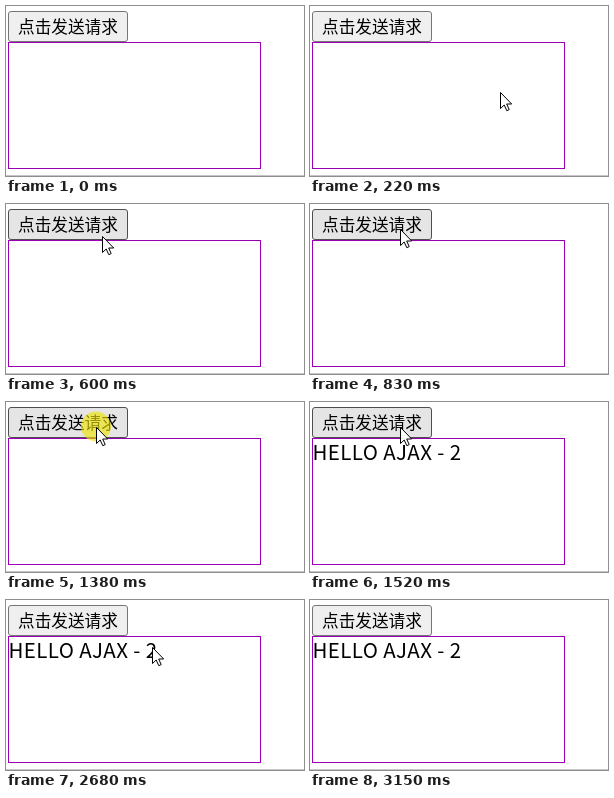
An HTML page that plays this animation: 298x170 px, repeating every 3850 ms.

```html
<!DOCTYPE html>
<html lang="zh-CN">
<head>
<meta charset="utf-8">
<title>AJAX</title>
<style>
  html, body { margin: 0; width: 100%; height: 100%; overflow: hidden; background: #fff; }
  svg { display: block; width: 100%; height: 100%; }
  text { font-family: "Noto Sans CJK SC", "Noto Sans CJK", "Noto Sans CJK JP", sans-serif; fill: #000; }
</style>
</head>
<body>
<svg viewBox="0 0 298 170" xmlns="http://www.w3.org/2000/svg">
  <rect width="298" height="170" fill="#fff"/>
  <rect y="169" width="298" height="1" fill="#c6c6c6"/>
  <rect id="button" x="2.5" y="5.5" width="119" height="30" rx="2.5"/>
  <text x="12" y="27" font-size="16.67">点击发送请求</text>
  <rect x="2.5" y="36.5" width="252" height="126" fill="none" stroke="#9900b3"/>
  <text id="reply" x="2.6" y="58" font-size="20.5" letter-spacing=".35">HELLO AJAX - 2</text>
  <circle id="press" cx="90" cy="24.5" r="15" fill="#f0e400" fill-opacity=".62"/>
  <path id="cursor" d="M.5 .5V16.5L4.2 13L6.8 18.7L9.2 17.6L6.7 12H11.7Z"
        fill="#fff" stroke="#000" stroke-width="1" stroke-linejoin="round"/>
</svg>
<script>
const LOOP = 3850;
const [button, reply, press, cursor] =
  ["button", "reply", "press", "cursor"].map(id => document.getElementById(id));

const strokes = [
  { from: 70, to: 520, steps: 6, end: 600, path: [[262, 152], [140, 32], [98, 36]] },
  { from: 600, to: 830, steps: 3, end: 2450, path: [[96, 32], [93, 27], [90, 25]] },
  { from: 2450, to: 2920, steps: 6, end: 2990, path: [[92, 25], [150, 45], [345, 146]] },
  { from: 2990, to: 3070, steps: 1, end: 3150, path: [[291, 162], [292, 163], [293, 165]] }
];

const between = (t, a, b) => t >= a && t < b;
const show = (el, on) => el.setAttribute("visibility", on ? "visible" : "hidden");

function pointerAt(t) {
  const s = strokes.find(s => between(t, s.from, s.end));
  if (!s) return null;
  const step = Math.floor((t - s.from) / (s.to - s.from) * s.steps + 1e-6);
  const u = Math.min(1, step / s.steps), v = 1 - u;
  const [a, b, c] = s.path;
  return [0, 1].map(i => Math.round(v * v * a[i] + 2 * u * v * b[i] + u * u * c[i]));
}

function draw(t) {
  const p = pointerAt(t);
  const hover = p && between(p[0], 2, 122) && between(p[1], 5, 36);
  button.setAttribute("fill", hover ? "#e5e5e5" : "#efefef");
  button.setAttribute("stroke", hover ? "#4f4f4f" : "#767676");
  show(reply, t >= 1520);
  show(press, between(t, 1380, 1520));
  show(cursor, p);
  if (p) cursor.setAttribute("transform", `translate(${p})`);
}

const start = performance.now();
function tick() {
  draw((performance.now() - start) % LOOP);
  requestAnimationFrame(tick);
}
tick();
</script>
</body>
</html>
```
